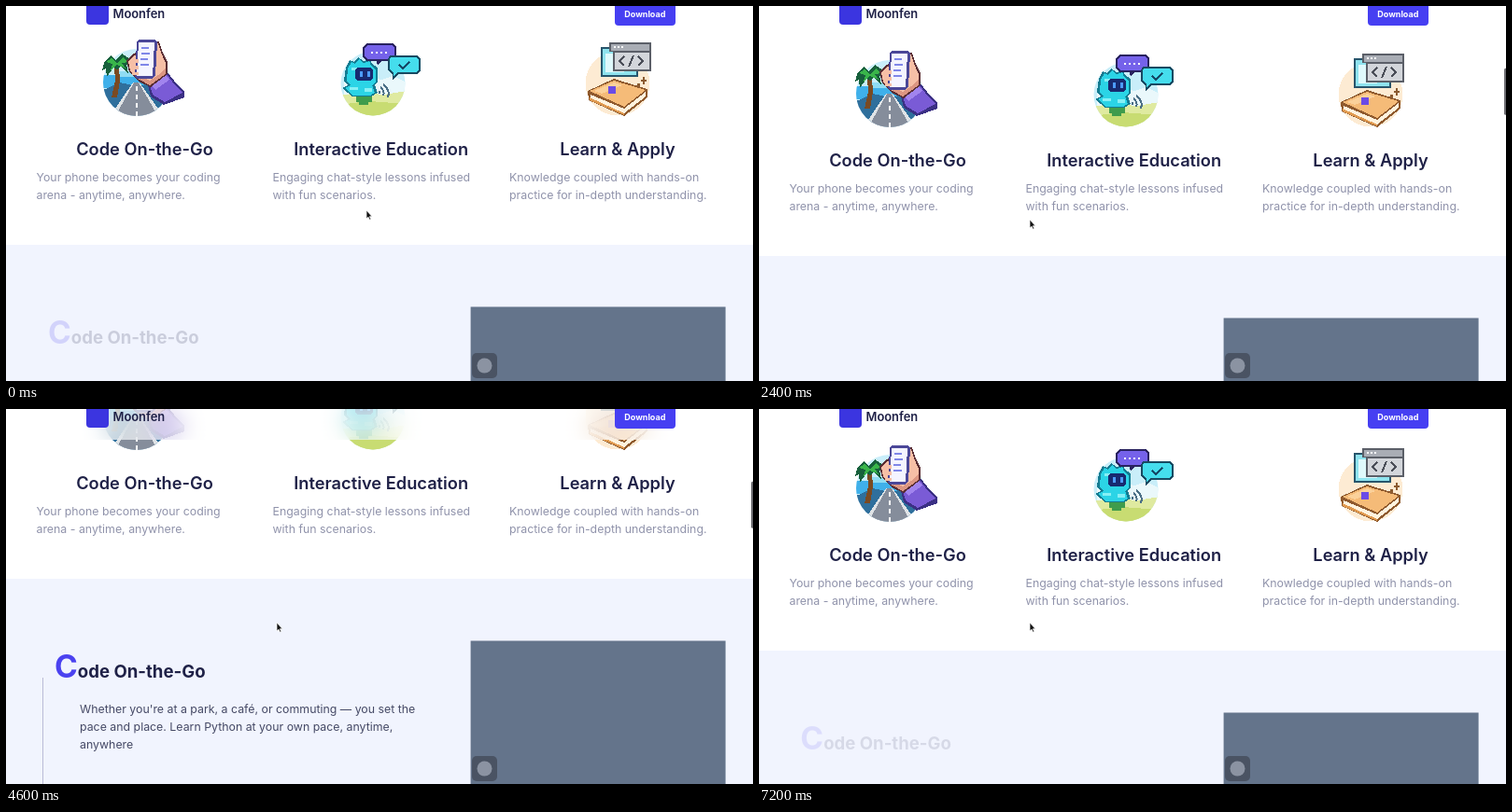
These frames come from a looping animation (800 px wide and 402 px high, 7.25 s). An HTML page:

```html
<!DOCTYPE html>
<html lang="en">
<head>
<meta charset="utf-8">
<title>Learning app page</title>
<style>
  html, body { margin: 0; width: 100%; height: 100%; overflow: hidden; background: #fff; }
  svg, header { position: absolute; left: 0; top: 0; }
  svg { width: 100%; height: 100%; overflow: hidden; font-family: Inter, sans-serif; }
  header { width: 100%; height: 33px; background: rgba(255,255,255,.66); backdrop-filter: blur(12px); }
  .art { shape-rendering: crispEdges; }
  .title { font-size: 18.25px; font-weight: 600; fill: #1f2147; text-anchor: middle; }
  .desc { font-size: 12.35px; fill: #9093ab; }
</style>
</head>
<body>
<svg>
  <defs>
    <clipPath id="c1"><circle cx="140" cy="82" r="36"/></clipPath>
    <clipPath id="c2"><circle cx="393" cy="83" r="34.5"/></clipPath>
  </defs>
  <g id="page">
  <g font-size="24.5" font-weight="700" fill="#1f2147">
    <text x="92" y="-49">Learn to code your own way, at your pace</text>
    <text x="92" y="-18.5">anytime, anywhere.</text>
  </g>

  <!-- palm beach, road, hand with phone -->
  <g class="art">
    <g clip-path="url(#c1)">
      <path fill="#c9eefa" d="M100 40h80v80h-80z"/>
      <path fill="#3fb0ea" d="M100 74h80v14h-80z"/>
      <path fill="#8fdcf3" d="M118 70h40v6h-40z"/>
      <path fill="#2f6f9c" d="M100 92l22-10 18 4 20-4 20 10v28h-80z"/>
      <path fill="#dfe3e6" d="M136 82h7l27 38h-60z"/>
      <path fill="#858d9b" d="M137 82h5l22 38h-48z"/>
      <path stroke="#fff" stroke-width="2" stroke-dasharray="5 4" d="M140 86v32"/>
    </g>
    <path fill="#7a4a22" d="M116 66h5l1 14-3 18h-6l4-18z"/>
    <path fill="#17603c" d="M105 61l7-8 6 5 6-7 9 6 3 8-7-2 2 9-8-7-4 3-4-2-7 10-1-9-4 2z"/>
    <path fill="#39b54a" d="M107 60l6-4 6 6 6-7 7 5-8 1 4 6-9-4-7 6 2-7z"/>
    <path fill="#3b3084" d="M152 85l21-14 7 9 11 12v6l-22 8-14-9z"/>
    <path fill="#7a5bd6" d="M154 85l18-12 6 8 11 12-19 10-13-8z"/>
    <path fill="#a184ee" d="M156 85l15-11 4 5-15 11z"/>
    <path fill="#5a2f35" d="M129 58l8-7 22-12 5-1 3 10 6 12v13l-18 14-13-6-10-10z"/>
    <path fill="#f6bfa6" d="M131 59l7-6 21-12 4-1 3 10 5 11v11l-17 13-11-6-10-9z"/>
    <path fill="#dc9682" d="M137 72l17 8 12-8 5-6v7l-17 12-11-6z"/>
    <path fill="#4b4798" d="M142 36h18l2 3-2 35-3 4h-17l-2-3 2-36z"/>
    <path fill="#f4f4ff" d="M142 39h17l-2 36h-17z"/>
    <path stroke="#7f86e8" stroke-width="2" d="M145 45h8M145 51h9M144 57h8M144 63h9"/>
    <path fill="#f6bfa6" d="M134 57h8v4h-8zM134 64h8v4h-8zM135 71h7v3h-7z"/>
  </g>

  <!-- chat robot -->
  <g class="art">
    <g clip-path="url(#c2)">
      <path fill="#c9eef9" d="M355 45h80v80h-80z"/>
      <path fill="#eaf8fb" d="M362 82l20-8 20 5 12-4 18 8v14h-70z"/>
      <path fill="#dfeaa0" d="M355 96l24-3 26 2 24-4v30h-74z"/>
      <path fill="#c8dc72" d="M355 106l34-4 40 3v14h-74z"/>
    </g>
    <path fill="#3f9c4c" d="M375 97h17v6h-4v3h-10v-3h-3z"/>
    <path fill="#157c92" d="M364 66l4-8 5 2 4-5 6 4 7-2 2 5 6 4v15l-3 3 3 9-7 4h-20l-11-9 6-3-4-5z"/>
    <path fill="#2bd4e6" d="M366 67l4-7 4 2 4-5 5 4 6-2 2 5 5 4v13l-4 4 3 8-5 3h-18l-9-8 6-3-4-5z"/>
    <path fill="#86f0f5" d="M370 66h9v3h-9zM368 87h9v3h-9zM384 88h8v4h-8z"/>
    <path fill="#172a70" d="M376 66h15l2 3v8l-2 3h-15l-2-3v-8z"/>
    <path fill="#4d9cff" d="M379 70h3v6h-3zM387 70h3v6h-3z"/>
    <path fill="none" stroke="#4b6f86" stroke-width="2" d="M400 94v-3M404 96q2-5-3-9M409 98q3-8-5-14"/>
    <path fill="#29235f" d="M386 40h28l4 4v11l-4 4h-12l-4 5-1-5h-11l-4-4V44z"/>
    <path fill="#7562ea" d="M387 42h26l3 3v9l-3 3h-26l-3-3v-9z"/>
    <path fill="#fff" d="M391 49h2v2h-2zM396 49h2v2h-2zM401 49h2v2h-2zM406 49h2v2h-2z"/>
    <path fill="#184a62" d="M411 53h29l4 4v12l-4 4h-20l-6 6v-6l-5-4V57z"/>
    <path fill="#45dded" d="M412 55h27l3 3v10l-3 3h-20l-4 4v-4l-4-3V58z"/>
    <path fill="none" stroke="#164b69" stroke-width="2" d="M421 63l4 4 7-7"/>
  </g>

  <!-- code windows and book -->
  <g class="art">
    <circle cx="655" cy="83" r="34.5" fill="#fdebd3"/>
    <path fill="#27556c" d="M637 44h40v32h-40z"/>
    <path fill="#8fe3ee" d="M639 46h36v28h-36z"/>
    <path fill="#dff9fb" d="M642 51h20v20h-20z"/>
    <path fill="#5b5f68" d="M646 39h45v31h-41v-21h-4z"/>
    <path fill="#a9adb5" d="M648 41h41v7h-41z"/>
    <path fill="#d3d6db" d="M652 50h37v18h-37z"/>
    <path stroke="#fff" stroke-width="2" stroke-dasharray="2 2" d="M651 44h10"/>
    <path fill="none" stroke="#4b4f59" stroke-width="2" d="M662 54l-5 5 5 5M672 53l-5 12M677 54l5 5-5 5"/>
    <path fill="#8f5a2e" d="M623 91l28-13 36 11v9l-25 20-38-17z"/>
    <path fill="#fff3de" d="M626 95l36 15 23-18v5l-23 18-36-15z"/>
    <path fill="#f5bb78" d="M625 91l26-11 34 10-23 18z"/>
    <path fill="#fbd19a" d="M630 91l21-9 9 3-22 9z"/>
    <path fill="#e09a50" d="M625 98l37 17v2l-37-16z"/>
    <path fill="#6b4be6" d="M645 86h8v8h-8z"/>
    <path fill="#8a5a30" d="M682 76h2v3h2v2h-2v3h-2v-3h-2v-2h2zM676 83h3v3h-3z"/>
  </g>

  <g class="title">
    <text x="148.5" y="160">Code On-the-Go</text>
    <text x="401.7" y="160">Interactive Education</text>
    <text x="655" y="160">Learn &amp; Apply</text>
  </g>
  <g class="desc">
    <text x="32.5" y="188">Your phone becomes your coding</text>
    <text x="32.5" y="207">arena - anytime, anywhere.</text>
    <text x="285.5" y="188">Engaging chat-style lessons infused</text>
    <text x="285.5" y="207">with fun scenarios.</text>
    <text x="539" y="188">Knowledge coupled with hands-on</text>
    <text x="539" y="207">practice for in-depth understanding.</text>
  </g>

  <path fill="#f1f4fe" d="M0 256h800v400H0z"/>
  <path fill="#64748b" d="M497.6 322.6h273v250h-273z"/>
  <rect id="line" x="39" y="362" width="1" fill="#b9bbd6"/>
  <text id="lead" y="361.5" font-weight="700" font-size="18.6" fill="#1f2147"><tspan font-size="33.5" fill="#4b42f0">C</tspan>ode On-the-Go</text>
  <g id="body" font-size="12.35" fill="#464a66">
    <text y="399.5">Whether you're at a park, a café, or commuting — you set the</text>
    <text y="418.5">pace and place. Learn Python at your own pace, anytime,</text>
    <text y="437.5">anywhere</text>
  </g>
  </g>
</svg>

<header></header>
<svg>
  <rect x="86" y="-4" width="24" height="24" rx="4" fill="#3b35e0"/>
  <text x="114.5" y="13" font-size="12.9" font-weight="600" fill="#1f2147">Moonfen</text>
  <rect x="652" y="-6" width="65" height="27" rx="4" fill="#463ff2"/>
  <text x="684.3" y="11.5" font-size="9" font-weight="700" fill="#fff" text-anchor="middle">Download</text>
  <rect x="499" y="372" width="27" height="27" rx="5" fill="#3a3f4b" fill-opacity=".62"/>
  <circle cx="512.5" cy="385.5" r="8" fill="#8b93a2"/>
  <rect id="thumb" x="798" width="4" height="50" rx="1.5" fill="#6d6d72"/>
  <path id="cursor" fill="#111" stroke="#fff" stroke-width=".7" d="M0 0v9l2-1.7 1.5 3 1.3-.7-1.4-2.9h2.6z"/>
</svg>

<script>
const LOOP = 7250;
const $ = id => document.getElementById(id);
const set = (id, attrs) => {
  for (const name in attrs) $(id).setAttribute(name, attrs[name]);
};

// Monotone cubic curve through [x, y] points, held flat at both ends.
function curve(...pts) {
  const rise = pts.slice(1).map((p, i) => (p[1] - pts[i][1]) / (p[0] - pts[i][0]));
  const slope = pts.map((_, i) => {
    const a = rise[i - 1], b = rise[i];
    return a * b > 0 ? 2 * a * b / (a + b) : 0;
  });
  return x => {
    if (x <= pts[0][0]) return pts[0][1];
    const i = pts.findIndex(p => p[0] >= x) - 1;
    if (i < 0) return pts[pts.length - 1][1];
    const [x0, y0] = pts[i], [x1, y1] = pts[i + 1];
    const w = x1 - x0, u = (x - x0) / w, v = 1 - u;
    return v * v * ((1 + 2 * u) * y0 + u * w * slope[i])
         + u * u * ((1 + 2 * v) * y1 - v * w * slope[i + 1]);
  };
}

// Top edge of the tinted section over time
const sectionTop = curve([0, 256], [900, 256], [1750, 223], [3100, 319], [3650, 259],
                         [4600, 182], [6150, 241], [6600, 259]);
const cursorMove = curve([300, 0], [1200, 1]);
const thumbAlpha = curve([850, 0], [950, 1], [6750, 1], [7050, 0]);

// Reveals that follow the scroll position
const leadAlpha = curve([182, 1], [223, .94], [241, .65], [256, .18], [259, .12], [268, 0]);
const leadX = curve([182, 52], [223, 51], [241, 49], [256, 45], [268, 43]);
const bodyAlpha = curve([188, 1], [223, .08], [231, 0]);
const bodyX = curve([188, 79], [223, 72]);
const lineLength = curve([182, 130], [223, 20], [232, 0]);

function draw(now) {
  const t = now % LOOP, top = Math.round(sectionTop(t)), k = cursorMove(t);
  set('page', { transform: `translate(0 ${top - 256})` });
  set('lead', { x: leadX(top), opacity: leadAlpha(top) });
  set('body', { transform: `translate(${bodyX(top)} 0)`, opacity: bodyAlpha(top) });
  set('line', { height: lineLength(top) });
  set('cursor', { transform: `translate(${386 - 96 * k} ${219 + 10 * k})` });
  set('thumb', { y: 60 + (319 - top) * .13, opacity: thumbAlpha(t) });
}

const start = performance.now();
function tick() {
  draw(performance.now() - start);
  requestAnimationFrame(tick);
}
tick();
</script>
</body>
</html>
```
